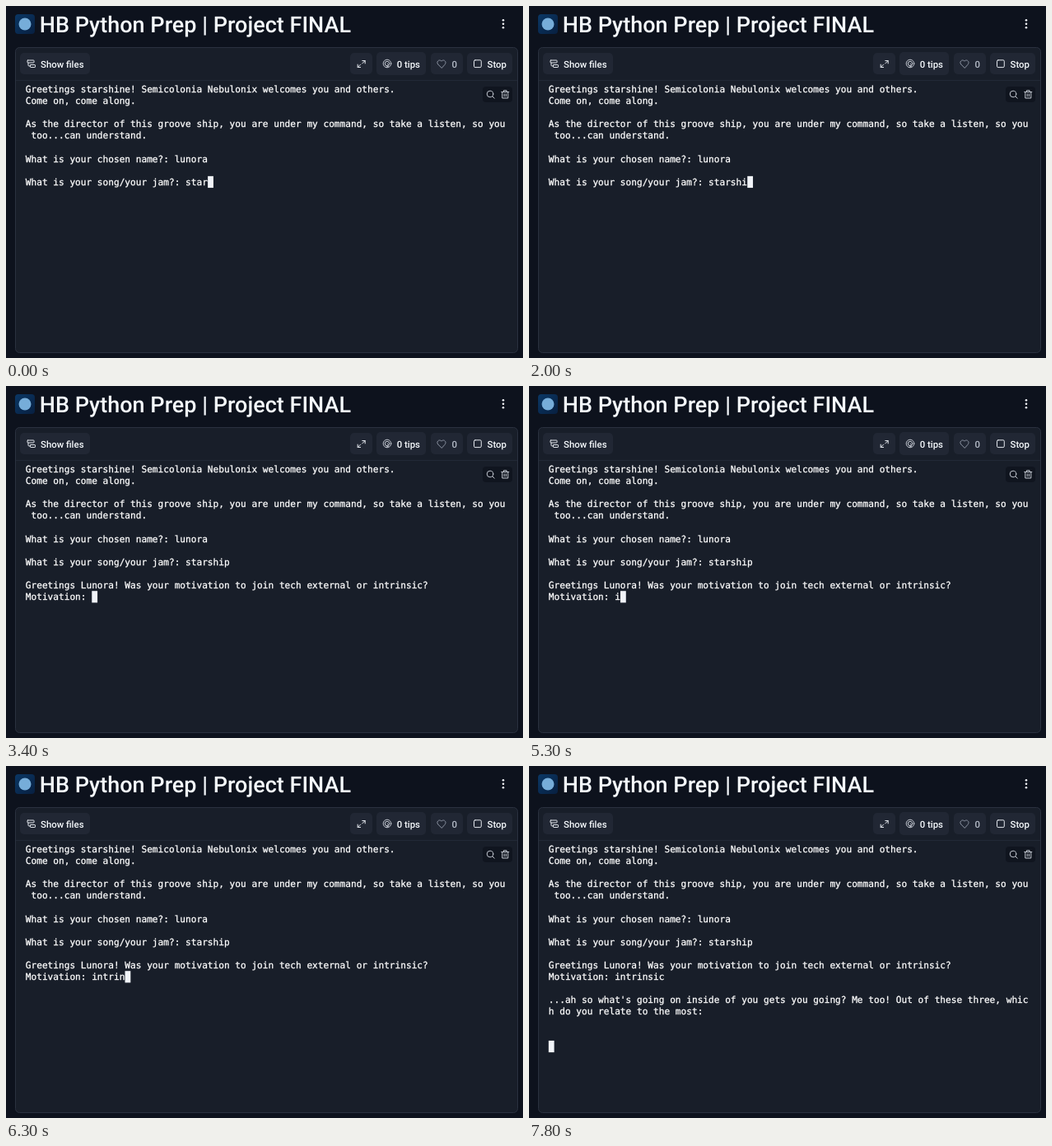
These frames come from a looping animation (628 by 428 pixels, 8000 ms). An HTML page:

```html
<!DOCTYPE html>
<html lang="en">
<head>
<meta charset="utf-8">
<title>Console session</title>
<style>
  html, body { margin: 0; width: 100%; height: 100%; overflow: hidden; background: #0d121d; }
  svg { display: block; width: 628px; height: 428px; }
  text { fill: #f5f9fc; white-space: pre; text-rendering: geometricPrecision; }
  .title { font: 500 27px Roboto, sans-serif; }
  .label { font: 500 11.4px Roboto, sans-serif; }
  .console text { font: 11.14px "DejaVu Sans Mono", monospace; fill: #fff; stroke: #fff; stroke-width: .28; }
  .button { fill: #212734; }
  .icon { fill: none; stroke: #e4e8ee; stroke-width: 1; stroke-linecap: round; stroke-linejoin: round; }
  .soft { stroke: #c3c8d1; }
  .label .muted { fill: #b3bac6; }
  .icon.muted { stroke: #8d95a4; }
</style>
</head>
<body>
<svg viewBox="0 0 628 428">
  <defs>
    <linearGradient id="tile" x2="1" y2="1">
      <stop stop-color="#0a3765"/>
      <stop offset="1" stop-color="#081f40"/>
    </linearGradient>
  </defs>

  <rect x="11" y="10" width="24" height="24" rx="4" fill="url(#tile)"/>
  <circle cx="23" cy="22" r="7.5" fill="#76add9"/>
  <text class="title" x="40.7" y="31.7">HB Python Prep | Project FINAL</text>
  <g fill="#f0f3f8">
    <circle cx="604" cy="17.2" r="1.3"/>
    <circle cx="604" cy="21.7" r="1.3"/>
    <circle cx="604" cy="26.2" r="1.3"/>
  </g>

  <rect x="11.5" y="50.5" width="610" height="371" rx="5" fill="#181e29" stroke="#2a313f"/>
  <path d="M12 90.5H621" stroke="#222936"/>

  <g class="button">
    <rect x="17" y="57" width="85" height="26" rx="5"/>
    <rect x="418" y="57" width="27" height="26" rx="5"/>
    <rect x="450" y="56" width="60" height="28" rx="5"/>
    <rect x="516" y="57" width="39" height="26" rx="5"/>
    <rect x="560" y="57" width="55" height="26" rx="5"/>
  </g>
  <rect x="579" y="98" width="36" height="19" rx="4" fill="#10151f"/>

  <g class="icon">
    <rect x="26" y="66" width="8" height="3" rx=".6"/>
    <rect x="29.5" y="71.5" width="6" height="3" rx=".6"/>
    <path d="M27 69v3q0 1 1 1h1.5"/>
    <path d="M432.8 66.5h3.4v3.4M436.2 66.5l-3.4 3.4M430.6 74.5h-3.4v-3.4M427.2 74.5l3.4-3.4"/>
    <rect x="568.5" y="65.8" width="8.8" height="8.8" rx="1.4"/>
  </g>
  <g class="icon soft">
    <circle cx="463" cy="70" r="4.8"/>
    <circle cx="463" cy="70" r="2.7"/>
    <path d="M463 70l1.4 1.4M461.5 74.5l3-1.2"/>
    <circle cx="588" cy="107" r="3.8"/>
    <path d="M590.8 109.8l2.4 2.4"/>
    <path d="M601.8 104.5h9M604.5 104.3v-1.6h3.6v1.6M602.8 104.6v7.4h7v-7.4M605.2 106.8v3M607.4 106.8v3"/>
  </g>
  <path class="icon muted" d="M529 75.2l-4.2-4.2c-2.8-3.2 1.6-7 4.2-3.8c2.6-3.2 7 .6 4.2 3.8z"/>

  <g class="label">
    <text x="42" y="74.5">Show files</text>
    <text x="474.7" y="74.5">0 tips</text>
    <text class="muted" x="541.4" y="74.5">0</text>
    <text x="584.6" y="74.5">Stop</text>
  </g>

  <g class="console" id="console"></g>
  <rect id="cursor" width="6.8" height="14.2" fill="#f1f4f9"/>
</svg>

<script>
const LOOP = 8000;
const LEFT = 23.8, TOP = 93.9, COLUMN = 6.707, ROW = 14.12, ASCENT = 10.9;

const intro = `Greetings starshine! Semicolonia Nebulonix welcomes you and others.
Come on, come along.

As the director of this groove ship, you are under my command, so take a listen, so you
 too...can understand.

What is your chosen name?: lunora

What is your song/your jam?: `;

const question = `${intro}starship

Greetings Lunora! Was your motivation to join tech external or intrinsic?
Motivation: `;

const reply = `${question}intrinsic

...ah so what's going on inside of you gets you going? Me too! Out of these three, whic
h do you relate to the most:


`;

// Each step: start time, settled text, number of letters typed, word being typed
const STEPS = [
  [0, intro, 4, 'starship'],
  [100, intro, 5, 'starship'],
  [300, intro, 6, 'starship'],
  [2000, intro, 7, 'starship'],
  [2300, intro, 8, 'starship'],
  [3400, question, 0, 'intrinsic'],
  [5300, question, 1, 'intrinsic'],
  [5500, question, 2, 'intrinsic'],
  [5800, question, 3, 'intrinsic'],
  [5900, question, 4, 'intrinsic'],
  [6000, question, 5, 'intrinsic'],
  [6200, question, 6, 'intrinsic'],
  [6700, question, 7, 'intrinsic'],
  [6900, question, 8, 'intrinsic'],
  [7100, question, 9, 'intrinsic'],
  [7700, reply, 0, '']
];

const consoleGroup = document.getElementById('console');
const cursor = document.getElementById('cursor');

const rows = reply.split('\n').map((_, i) => {
  const row = document.createElementNS('http://www.w3.org/2000/svg', 'text');
  row.setAttribute('x', LEFT);
  row.setAttribute('y', TOP + i * ROW + ASCENT);
  return consoleGroup.appendChild(row);
});

let shown;

function show(step) {
  if (step === shown) return;
  shown = step;
  const [, settled, count, word] = step;
  const lines = (settled + word.slice(0, count)).split('\n');
  rows.forEach((row, i) => { row.textContent = lines[i] || ''; });
  cursor.setAttribute('x', LEFT + lines[lines.length - 1].length * COLUMN);
  cursor.setAttribute('y', TOP + (lines.length - 1) * ROW);
}

const start = performance.now();

function frame(now) {
  const time = Math.max(0, now - start) % LOOP;
  show(STEPS.findLast(([at]) => at <= time));
  requestAnimationFrame(frame);
}

show(STEPS[0]);
requestAnimationFrame(frame);
</script>
</body>
</html>
```
